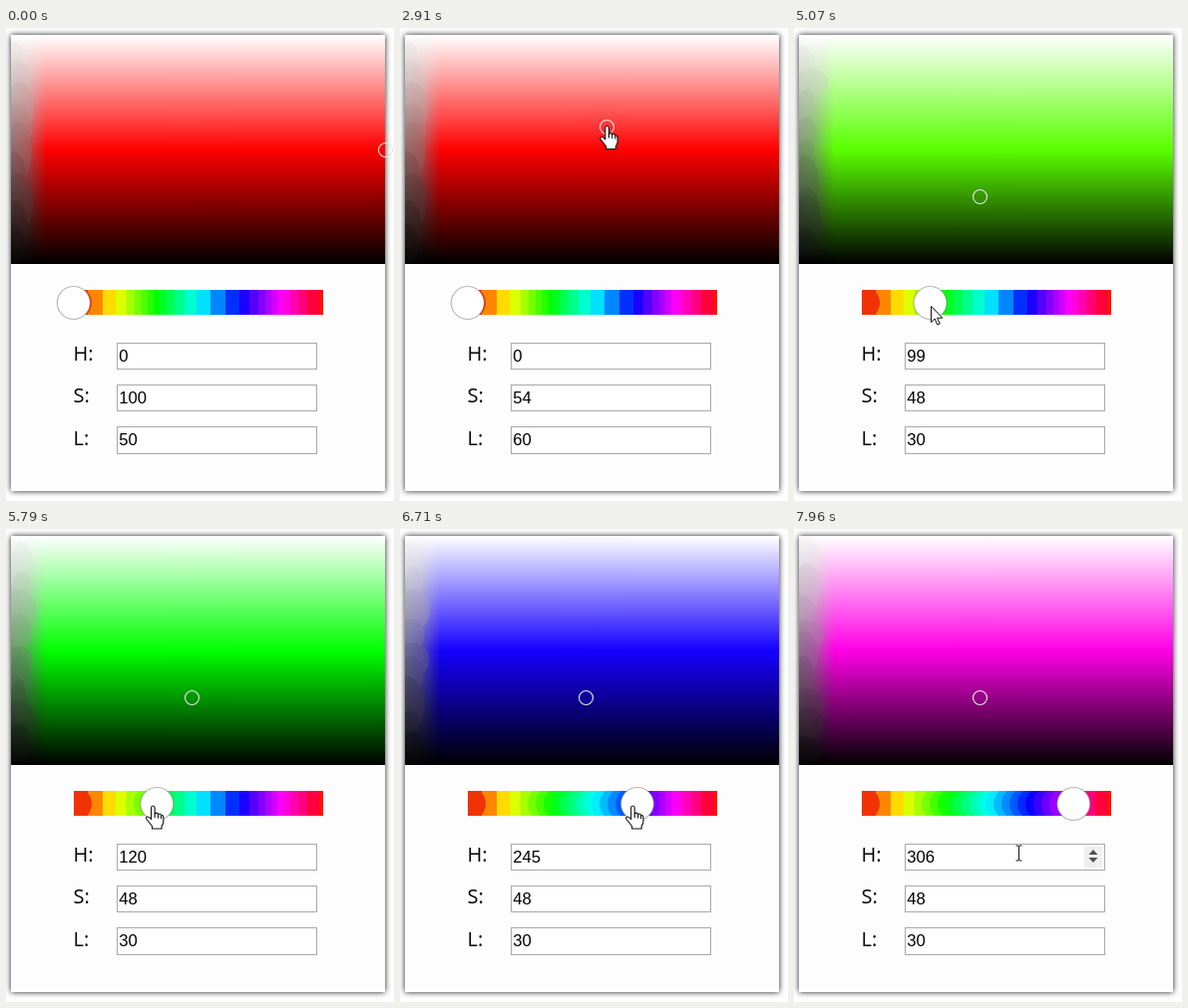
Recreate the animation shown at these times as an HTML page. Size 389 by 475 pixels, loop 8 s.

```html
<!DOCTYPE html>
<html lang="en">
<head>
<meta charset="utf-8">
<title>HSL colour picker</title>
<style>
  html, body { margin: 0; width: 100%; height: 100%; overflow: hidden; background: #fff; }
  .panel { position: absolute; left: 5px; top: 7px; width: 375px; height: 458px; background: #fdfdfd; box-shadow: 0 0 6px rgba(0, 0, 0, .9); }
  svg { position: absolute; left: 0; top: 0; display: block; }
  .label { font: 20px "Open Sans", "Noto Sans", sans-serif; }
  .value { font: 16.67px "Liberation Sans", Arial, sans-serif; }
</style>
</head>
<body>
<div class="panel"></div>
<svg width="389" height="475" viewBox="0 0 389 475">
  <defs>
    <linearGradient id="shade" x2="0" y2="1">
      <stop stop-color="#fff"/><stop id="pure" offset=".5"/><stop offset="1"/>
    </linearGradient>
    <linearGradient id="grey" x2="0" y2="1">
      <stop stop-color="#fff"/><stop offset=".5" stop-color="#808080"/><stop offset="1"/>
    </linearGradient>
    <linearGradient id="fade">
      <stop stop-color="#fff" stop-opacity=".8"/>
      <stop offset=".5" stop-color="#fff" stop-opacity=".55"/>
      <stop offset="1" stop-color="#fff" stop-opacity="0"/>
    </linearGradient>
    <mask id="leftSide"><rect x="5" y="7" width="36" height="230" fill="url(#fade)"/></mask>
    <clipPath id="field"><rect x="5" y="7" width="375" height="230"/></clipPath>
    <clipPath id="bar"><rect x="68" y="263" width="250" height="25"/></clipPath>
  </defs>

  <rect x="5" y="7" width="375" height="230" fill="url(#shade)"/>
  <rect x="5" y="7" width="36" height="230" fill="url(#grey)" mask="url(#leftSide)"/>
  <g id="patches" clip-path="url(#field)" opacity=".25"></g>
  <circle id="picker" r="7" fill="none" stroke="#e4e4e4" stroke-width="1.1"/>

  <g id="hues" clip-path="url(#bar)"></g>
  <circle id="knob" cy="276" r="16.5" fill="#fff" stroke="#777" stroke-opacity=".5" stroke-width="1.2"/>

  <g id="rows"></g>

  <g id="spinner">
    <rect x="291" y="319" width="18" height="21" fill="#efefef"/>
    <path d="M295.5 327h9l-4.5-5zM295.5 330h9l-4.5 5z" fill="#505050"/>
  </g>

  <g id="cursor" stroke="#111" fill="#fff" stroke-linejoin="round">
    <path id="arrow" d="M.5.5V16.5L4.2 13 6.8 19 9.2 18 6.6 12.2H11.8Z"/>
    <g id="hand" stroke-width="1.1">
      <path d="M-2 2Q-2 0-.2 0T1.6 2V8Q4 6 5 8.6 7.5 7 8 9.5 10.3 9 10.3 12V16Q10 19 8.5 20V23H-1V20.5Q-3 18-6.5 13.5-8 11-5.5 11-4 11-2 13.5Z"/>
      <path d="M1.6 7.5v4.5M5 8.5v4M8 9.5v3.5" fill="none"/>
    </g>
    <path id="beam" d="M-3-7.5h2.5l.5.5.5-.5H3M0-7V7M-3 7.5h2.5L0 7l.5.5H3" fill="none"/>
  </g>
</svg>
<script>
const LOOP = 8000, STEP = 77;
const $ = id => document.getElementById(id);

function set(node, attrs) {
  for (const name in attrs) node.setAttribute(name, attrs[name]);
}
function add(id, tag, attrs, text = '') {
  const node = document.createElementNS('http://www.w3.org/2000/svg', tag);
  set(node, attrs);
  node.textContent = text;
  $(id).append(node);
  return node;
}
const show = (node, on) => { node.style.display = on ? '' : 'none'; };

const knobX = hue => 67.8 + hue / 360 * 250;
const hueAt = x => (x - 68) / 250 * 360;
const pure = hue => `hsl(${hue} 100% 50%)`;

// Each move takes the named parts to a goal between two times
const point = (x, y) => ({ pointer: [x, y] });
const dragPicker = (x, y) => ({ picker: [x, y], pointer: [x + .3, y - 1] });
const dragKnob = hue => ({ hue: [hue], pointer: [knobX(hue) - 4.3, 278] });
const moves = [
  [190, 960, point(293, 123)],
  [1040, 1040, point(293, 119)],
  [1270, 1270, { picker: [292.5, 119.5] }],
  [1440, 1440, point(296, 120)],
  [1590, 1750, point(293, 120)],
  [2000, 2300, dragPicker(268, 119.5)],
  [2450, 2910, dragPicker(207.5, 99.5)],
  [2985, 3210, dragPicker(197, 92)],
  [3290, 3970, dragPicker(186.5, 169.5)],
  [4140, 4520, point(126, 294)],
  [4690, 4850, point(137, 279)],
  [5070, 5070, { hue: [99] }],
  [5400, 5400, point(133, 278)],
  [5650, 6170, dragKnob(184)],
  [6247, 6710, dragKnob(245)],
  [6787, 7170, dragKnob(306)],
  [7420, 7960, point(225.5, 325.5)]
];

// The screen refreshes in even steps within a move
function progress(t, from, to) {
  const gaps = Math.round((to - from) / STEP);
  const done = gaps ? Math.floor((t - from) / (to - from) * gaps + .001) : 0;
  return Math.min(1, (done + 1) / (gaps + 1));
}

function stateAt(t) {
  const state = { pointer: [389, 465], picker: [380.5, 122.5], hue: [0] };
  for (const [from, to, goals] of moves) {
    if (t < from) break;
    const k = progress(t, from, to);
    for (const part in goals) {
      state[part] = state[part].map((v, i) => v + (goals[part][i] - v) * k);
    }
  }
  return state;
}

// Bands are wide around orange and cyan, narrow around green and violet
for (let x = 68, width; x < 318; x += width) {
  width = 10.5 + 4.5 * Math.cos((hueAt(x) - 15) * Math.PI / 90);
  add('hues', 'rect', { x: Math.round(x), y: 263, width: 318 - x, height: 25, fill: pure(hueAt(x + width / 2)) });
}
const disc = (cx, fill) => add('hues', 'circle', { cx, cy: 276, r: 17, fill });
disc(69, '#f03205');

// Discs left behind by the dragged knob
const trail = [];
for (let x = 137; x < 280; x += 8) {
  trail.push({ x, node: disc(x, pure(hueAt(x - 13))) });
}

const values = ['H:', 'S:', 'L:'].map((name, i) => {
  const offset = 42.3 * i, top = Math.floor(316 + offset), bottom = Math.floor(342.4 + offset);
  add('rows', 'text', { x: 67.5, y: 334 + offset, class: 'label' }, name);
  add('rows', 'rect', { x: 111.5, y: top + .5, width: 200, height: bottom - top, fill: '#fff', stroke: '#a9a9a9' });
  return add('rows', 'text', { x: 113.3, y: 334.6 + offset, class: 'value' });
});

// Uneven grey patches at the left of the field
const patches = Array.from({ length: 9 }, () => add('patches', 'ellipse', {}));
function scatter(hue) {
  let seed = Math.round(hue) + 7;
  const random = () => (seed = seed * 16807 % 2147483647) / 2147483647;
  random();
  patches.forEach((node, i) => {
    const cy = 30 + i * 23 + random() * 10;
    set(node, {
      cx: 6 + random() * 10, cy, rx: 8 + random() * 11, ry: 14 + random() * 16,
      fill: `hsl(0 0% ${100 - (cy - 7) / 2.3}%)`
    });
  });
}

function render(t) {
  const { pointer, picker: [x, y], hue: [hue] } = stateAt(t);
  const knob = knobX(hue);

  set($('pure'), { 'stop-color': pure(hue) });
  scatter(hue);
  set($('picker'), { cx: x, cy: y });
  set($('knob'), { cx: knob });
  for (const mark of trail) show(mark.node, mark.x < knob);

  const hsl = [hue, Math.min(100, (x - 5) / 3.75), (237.5 - y) / 2.3];
  hsl.forEach((v, i) => { values[i].textContent = Math.round(v); });

  const typing = t >= 7420 && pointer[1] > 316;
  const hand = t >= 1440 && t < 4140 || t >= 5400 && t < 7420;
  show($('cursor'), t >= 190);
  show($('arrow'), !hand && !typing);
  show($('hand'), hand);
  show($('beam'), typing);
  show($('spinner'), typing);
  set($('cursor'), { transform: `translate(${pointer})` });
}

const start = performance.now();
function tick() {
  render((performance.now() - start) % LOOP);
  requestAnimationFrame(tick);
}
tick();
</script>
</body>
</html>
```
